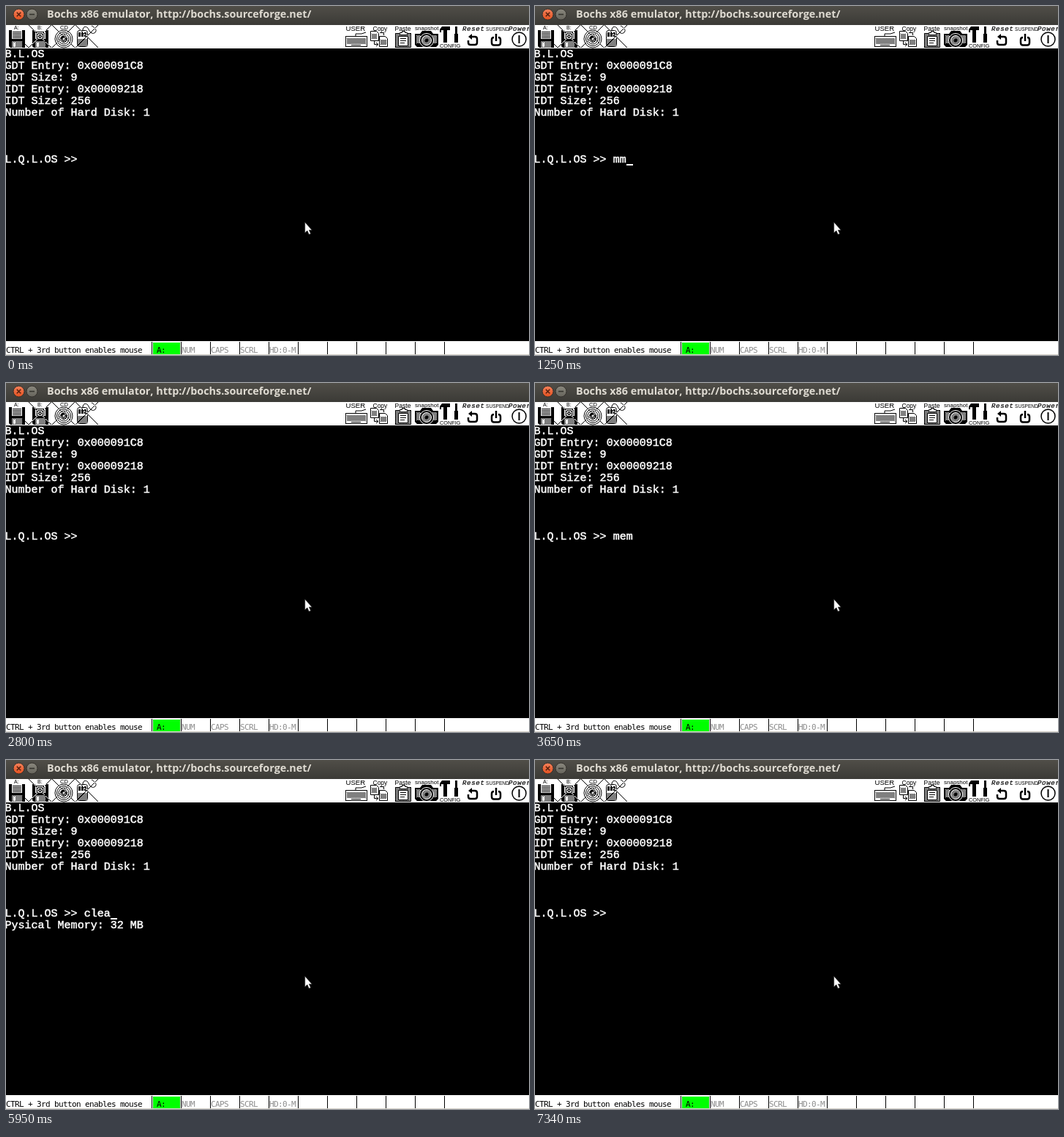
Write an HTML page that moves like this. It is 715 by 477 pixels and loops after 7420 ms.

```html
<!DOCTYPE html>
<html lang="en">
<head>
<meta charset="utf-8">
<title>Emulator session</title>
<style>
html, body { margin: 0; width: 100%; height: 100%; overflow: hidden; background: #000; }
svg { display: block; width: 100vw; height: 100vh; }
text { white-space: pre; }
.term { font: 15px "Liberation Mono", monospace; fill: #fff; stroke: #fff; stroke-width: .5px; }
.status { font: 11px "DejaVu Sans Mono", monospace; letter-spacing: -.62px; }
.label { font-family: "Liberation Sans", sans-serif; }
.slant { font: italic 9px "Liberation Mono", monospace; letter-spacing: .7px; stroke: #000; stroke-width: .2px; }
.line { fill: none; stroke: #000; }
.box { fill: #fff; stroke: #000; }
.invert { mix-blend-mode: difference; }
</style>
</head>
<body>
<svg id="stage" viewBox="0 0 715 477" preserveAspectRatio="none">
  <defs>
    <linearGradient id="bar" x2="0" y2="1">
      <stop offset="0" stop-color="#504e48"/>
      <stop offset="1" stop-color="#3b3a36"/>
    </linearGradient>
    <linearGradient id="orange" x2="0" y2="1">
      <stop offset="0" stop-color="#f4825c"/>
      <stop offset="1" stop-color="#e2501f"/>
    </linearGradient>
    <linearGradient id="grey" x2="0" y2="1">
      <stop offset="0" stop-color="#8a887e"/>
      <stop offset="1" stop-color="#66645c"/>
    </linearGradient>
    <pattern id="dots" width="2" height="2" patternUnits="userSpaceOnUse">
      <rect width="2" height="2" fill="#fff"/>
      <path d="M0 0h1v1h1v1h-1v-1h-1z" shape-rendering="crispEdges"/>
    </pattern>
    <pattern id="keys" width="3" height="3" patternUnits="userSpaceOnUse">
      <rect width="3" height="3" fill="#fff"/>
      <path d="M0 0h2v2h-2z" shape-rendering="crispEdges"/>
    </pattern>
    <g id="floppy">
      <path d="M4 33H26V57H6L4 55z"/>
      <path d="M8 33H22V45H8z" fill="#fff"/>
      <path class="line" d="M9 35.5H21M9 37.5H21M9 39.5H21M9 41.5H21M9 43.5H21"/>
      <path d="M8 48H22V57H8z" fill="url(#dots)"/>
      <path d="M10 50H13V56H10z" fill="#fff"/>
    </g>
    <path id="cross" class="invert" fill="none" stroke="#fff" d="M0 26L31 57M31 26L0 57"/>
  </defs>

  <rect width="715" height="477"/>

  <g id="titlebar">
    <rect width="715" height="26" fill="url(#bar)"/>
    <circle cx="17.5" cy="11.5" r="7.5" fill="url(#orange)" stroke="#33302b"/>
    <path d="M14.8 8.8L20.2 14.2M20.2 8.8L14.8 14.2" stroke="#54200e" stroke-width="1.6"/>
    <circle cx="35.5" cy="11.5" r="7.5" fill="url(#grey)" stroke="#33302b"/>
    <path d="M32 11.5H39" stroke="#35332e" stroke-width="1.6"/>
    <text x="56" y="16" fill="#dfdbd2" style="font:bold 14.36px 'Open Sans',sans-serif">Bochs x86 emulator, http://bochs.sourceforge.net/</text>
  </g>

  <g id="toolbar">
    <rect y="26" width="715" height="32" fill="#fff"/>
    <use href="#floppy"/>
    <path class="line" d="M26 52L31 57"/>
    <use href="#floppy" x="32"/>
    <use href="#cross" x="31"/>

    <g class="line">
      <circle cx="79" cy="45" r="12" fill="#fff"/>
      <circle cx="79" cy="45" r="9.5"/>
      <circle cx="79" cy="45" r="7"/>
      <circle cx="79" cy="45" r="4.5" fill="url(#dots)"/>
      <circle cx="79" cy="45" r="2" fill="#fff"/>
    </g>
    <use href="#cross" x="63"/>

    <rect class="box" x="97.5" y="33.5" width="14" height="22" rx="3"/>
    <rect x="98" y="45" width="13" height="10" fill="url(#dots)"/>
    <path d="M99 36h3v6h-3zM103 36h3v6h-3zM107 36h3v6h-3z"/>
    <path class="line" d="M105 33C105 27 111 27 113 32S119 39 122 36S121 29 117 27"/>
    <use href="#cross" x="95"/>

    <path class="line" d="M478 41V38H486L492 36"/>
    <rect class="box" x="464.5" y="41.5" width="29" height="14"/>
    <rect x="466" y="44" width="26" height="8" fill="url(#dots)"/>
    <path d="M472 53h13v1h-13z"/>

    <path class="box" d="M498.5 34.5H506.5L509.5 37.5V47.5H498.5zM510.5 41.5H518.5L521.5 44.5V55.5H510.5z"/>
    <path d="M500 38h7v7h-7zM512 46h8v7h-8z" fill="url(#dots)"/>
    <path class="line" d="M503.5 48V52.5H508M506 50L509 52.5L506 55M511 36.5H516.5V40"/>

    <rect x="532.5" y="37.5" width="21" height="19" fill="url(#dots)" stroke="#000"/>
    <path class="box" d="M536.5 41.5H549.5V54.5H536.5z"/>
    <path class="box" d="M538.5 39.5V36.5H541.5V34.5H545.5V36.5H548.5V39.5z"/>
    <path class="line" d="M539 44.5H547M539 47.5H547M539 50.5H545"/>

    <path d="M559 38H566L569 34H581L584 38H591V53L588 56H562L559 53z"/>
    <path d="M561 40h6v11h-6zM583 40h6v11h-6z" fill="url(#dots)"/>
    <circle cx="575" cy="47" r="9.5" stroke="#fff"/>
    <circle cx="575" cy="47" r="6.5" fill="url(#dots)" stroke="#fff"/>
    <circle cx="575" cy="47" r="2.5"/>

    <path d="M593 32L596 28H607V33H603V50H598V33H595V36H593z"/>
    <path d="M614 28H617V38H618V50H613V38H614z"/>

    <path class="line" stroke-width="2.5" d="M636 42H641Q644 42 644 45V50Q644 53 641 53H635Q632 53 632 50V47"/>
    <path d="M632 42L637 38V46z"/>
    <path class="line" stroke-width="2.5" d="M667 43Q664 43 664 46V50Q664 53.5 667 53.5H673Q676 53.5 676 50V46Q676 43 673 43M670 38V48"/>
    <circle class="line" cx="701.5" cy="45.5" r="9.5" stroke-width="1.5"/>
    <path class="line" stroke-width="2" d="M701.5 40V51"/>
  </g>

  <g id="statusbar">
    <rect y="458" width="715" height="19" fill="#fff"/>
    <rect y="476" width="715" height="1" fill="#d8d4cb"/>
    <rect x="201" y="460" width="37" height="16" fill="#0f0"/>
  </g>

  <g id="screen"></g>
  <rect id="caret" y="216" width="9" height="2" fill="#fff"/>
  <path d="M408.7 295.5V310L411.9 307.1L414.2 312.2L416.6 311.2L414.3 306.3H418.2z"
        fill="#fff" stroke="#222" stroke-width=".6"/>
</svg>
<script>
const LOOP = 7420, CELL = 9, ROW = 16, TOP = 58, PROMPT = 'L.Q.L.OS >> ';
const $ = id => document.getElementById(id);

function add(parent, tag, attrs, content = '') {
  const el = document.createElementNS('http://www.w3.org/2000/svg', tag);
  for (const key in attrs) el.setAttribute(key, attrs[key]);
  el.textContent = content;
  return parent.appendChild(el);
}

// Toolbar captions: text, x, baseline, size
[
  ['A:', 11, 32, 7], ['B:', 43, 32, 7], ['CD', 74, 32, 7.5],
  ['USER', 464.5, 34, 9.6], ['Copy', 501.5, 33.5, 8.5], ['Paste', 531.5, 33.5, 8.6],
  ['snapshot', 559, 32.5, 8], ['CONFIG', 593, 57, 7.3], ['SUSPEND', 656, 34, 6.6]
].forEach(([s, x, y, size]) => add($('toolbar'), 'text', { class: 'label', x, y, 'font-size': size }, s));
add($('toolbar'), 'text', { class: 'slant', x: 624, y: 34 }, 'Reset');
add($('toolbar'), 'text', { class: 'slant', x: 687, y: 34 }, 'Power');

// Status cells
const bar = $('statusbar');
const cell = (s, x, fill) => add(bar, 'text', { class: 'status', x, y: 473.5, fill }, s);
for (let x = 199; x < 600; x += 40) add(bar, 'rect', { x, y: 459, width: 1, height: 17 });
cell('CTRL + 3rd button enables mouse', 0, '#000');
cell('A:', 206, '#000');
['NUM', 'CAPS', 'SCRL', 'HD:0-M'].forEach((s, i) => cell(s, 240 + 40 * i, '#8c8c8c'));

// Terminal rows
const row = (n, s = '') => add($('screen'), 'text', { class: 'term', x: -1.4, y: TOP + ROW * n + 12 }, s);
[
  'B.L.OS', 'GDT Entry: 0x000091C8', 'GDT Size: 9',
  'IDT Entry: 0x00009218', 'IDT Size: 256', 'Number of Hard Disk: 1'
].forEach((s, i) => row(i, s));
const input = row(9), output = row(10);

// Start time, typed text, caret shown
const steps = [
  [0, '', 0], [200, '', 1], [530, '', 0], [720, '', 1], [920, 'm', 1], [1120, 'm', 0],
  [1250, 'mm', 1], [1450, 'mm', 0], [1590, 'mm', 1], [1920, 'm', 1], [2070, 'm', 0],
  [2330, '', 1], [2600, '', 0], [2930, '', 1], [3190, 'm', 1], [3450, 'me', 0],
  [3650, 'mem', 0], [4030, 'mem', 1], [4300, 'mem', 0], [4500, '', 1], [4700, '', 0],
  [4830, '', 1], [4960, '', 0], [5220, '', 1], [5360, 'c', 0], [5560, 'cl', 1],
  [5690, 'cle', 0], [5950, 'clea', 1], [6090, 'clea', 0], [6220, 'clear', 1],
  [6370, 'clear', 0], [6690, '', 1], [6960, '', 0], [7150, '', 1], [7340, '', 0]
];
const ENTER_MEM = 4500, ENTER_CLEAR = 6690;

function draw(t) {
  const [, typed, caret] = steps.findLast(s => s[0] <= t);
  input.textContent = PROMPT + typed;
  output.textContent = t >= ENTER_MEM && t < ENTER_CLEAR ? 'Pysical Memory: 32 MB' : '';
  $('caret').setAttribute('x', (PROMPT + typed).length * CELL - 1);
  $('caret').setAttribute('visibility', caret ? 'visible' : 'hidden');
}

const start = performance.now();
function tick() {
  draw((performance.now() - start) % LOOP);
  requestAnimationFrame(tick);
}
tick();
</script>
</body>
</html>
```
